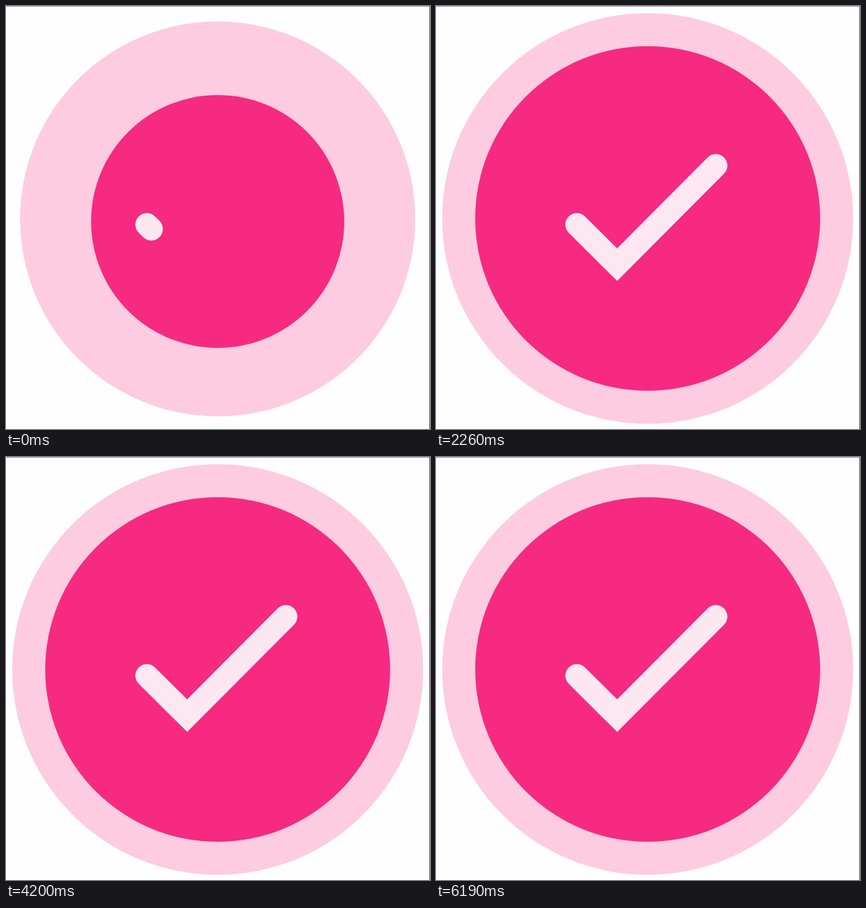
Recreate the animation shown at these times as an HTML page. Size 653 by 652 pixels, loop 6330 ms.

```html
<!DOCTYPE html>
<html lang="en">
<head>
<meta charset="utf-8">
<title>Check button</title>
<style>
  html, body { margin: 0; width: 100%; height: 100%; overflow: hidden; background: #fefefe; }
  svg { display: block; width: 653px; height: 652px; }
</style>
</head>
<body>
<svg viewBox="0 0 653 652">
  <rect width="653" height="652" fill="#fefefe"/>
  <circle id="halo" cx="326" fill="#fdcce1"/>
  <circle id="disc" cx="326" fill="#f52a80"/>
  <path id="tick" d="M217 337 L279 398.7 L431 246" fill="none" stroke="#fde8f1"
        stroke-width="35.6" stroke-linecap="round" stroke-miterlimit="10"/>
  <path id="pointer" d="M.5 .5V16.5L4.2 13L6.8 18.8L9.2 17.8L6.7 12H11.5Z"
        fill="#fff" stroke="#000" stroke-width="1"/>
  <rect width="653" height="1" fill="#929292"/>
  <rect x="652" width="1" height="652" fill="#555"/>
</svg>
<script>
const LOOP = 6330;
const ORIGIN_Y = 345;
const $ = id => document.getElementById(id);
const halo = $('halo'), disc = $('disc'), tick = $('tick'), pointer = $('pointer');
const tickLength = tick.getTotalLength();

// The picture advances only at these moments.
const steps = [0, 120, 250, 370, 900, 1020, 1140, 1300, 1450, 1600, 1720, 1840, 1990, 2110, 2260,
  3050, 3170, 3290, 3410, 3560, 3680, 3800, 3950, 4080, 4200,
  5010, 5140, 5290, 5440, 5560, 5680, 5830, 5950, 6070, 6190];

// Each press clears the button at `reset`; its growth is timed from `start`.
const presses = [
  { reset: 0, start: -870 },
  { reset: 1140, start: 1061 },
  { reset: 3050, start: 2988 },
  { reset: 5010, start: 4940 }
];

// Progress curves as [age, progress], eased by a half sine.
const haloCurve = [[0, 0], [620, .601], [985, 1]];
const discCurve = [[310, 0], [692, .3704], [870, .655], [1086, 1]];
const tickCurve = [[828, 0], [1198, 1]];

const pointerPath = { 900: [632, 525], 1020: [525, 503], 1140: [427, 484] };

function progress(curve, age) {
  if (age <= curve[0][0]) return 0;
  for (let i = 1; i < curve.length; i++) {
    const [a, from] = curve[i - 1], [b, to] = curve[i];
    if (age < b) {
      const x = from + (to - from) * (age - a) / (b - a);
      return Math.sin(x * Math.PI / 2) ** 2;
    }
  }
  return 1;
}

function scaleCircle(circle, radius, scale) {
  circle.setAttribute('r', radius * scale);
  circle.setAttribute('cy', ORIGIN_Y - 17.5 * scale);
}

function draw(time) {
  const now = steps.findLast(s => s <= time);
  const age = now - presses.findLast(p => p.reset <= now).start;
  scaleCircle(halo, 316.5, progress(haloCurve, age));
  scaleCircle(disc, 265.6, progress(discCurve, age));

  const drawn = progress(tickCurve, age);
  tick.style.display = drawn > 0 ? '' : 'none';
  tick.setAttribute('stroke-dasharray',
    drawn < 1 ? `${tickLength * drawn} ${tickLength * 2}` : 'none');

  const tip = pointerPath[now];
  pointer.style.display = tip ? '' : 'none';
  if (tip) pointer.setAttribute('transform', `translate(${tip})`);
}

const begin = performance.now();
function frame() {
  draw((performance.now() - begin) % LOOP);
  requestAnimationFrame(frame);
}
frame();
</script>
</body>
</html>
```
